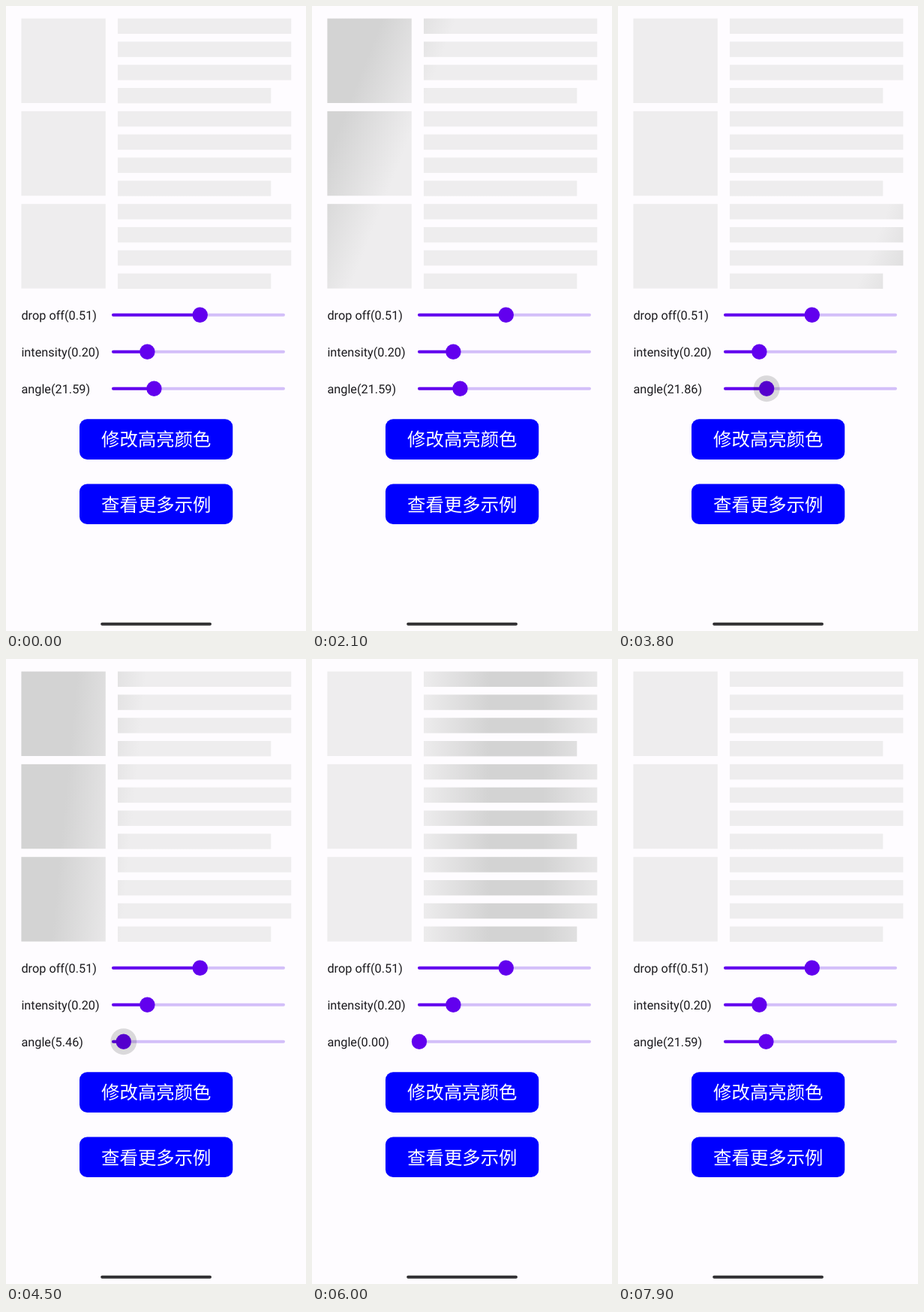
Recreate the animation shown at these times as an HTML page. Size 400 px wide and 831 px high, loop 8000 ms.

```html
<!DOCTYPE html>
<html lang="zh-CN">
<head>
<meta charset="utf-8">
<title>Shimmer</title>
<style>
html, body { margin: 0; width: 100%; height: 100%; overflow: hidden; background: #fefcff; }
svg { display: block; width: 400px; height: 831px; text-rendering: geometricPrecision; }
.label { font: 16.3px Roboto, sans-serif; fill: #1c1b1f; }
.button { font: 24.4px "Noto Sans CJK SC", "Noto Sans CJK", sans-serif; fill: #fff; text-anchor: middle; }
</style>
</head>
<body>
<svg id="stage" viewBox="0 0 400 831"></svg>
<script>
const LOOP = 8000, STEP = 100;
const SIZE = 360, CENTER = [200.5, 196.5];
const FIRST_SWEEP = 600, SWEEP = 1000, PAUSE = 200;
const DROP_OFF = 0.51, INTENSITY = 0.2, TILT = 21.59, HELD_TILT = 21.86;
const BASE = '#eeedee', HIGHLIGHT = '#d3d3d3', BLUE = '#0000ff', PURPLE = '#6200ee';
const stage = document.getElementById('stage');

const clamp = v => Math.min(1, Math.max(0, v));
const ramp = (t, from, to) => clamp((t - from) / (to - from));

function add(tag, attrs, text = '', parent = stage) {
  const el = document.createElementNS('http://www.w3.org/2000/svg', tag);
  for (const key in attrs) el.setAttribute(key, attrs[key]);
  el.textContent = text;
  return parent.appendChild(el);
}

function box(x, y, width, height, fill, rx = 0) {
  return add('rect', { x, y, width, height, fill, rx });
}

function addShine() {
  const gradient = add('linearGradient', {
    id: 'shine', gradientUnits: 'userSpaceOnUse', x1: -SIZE / 2, x2: SIZE / 2, y1: 0, y2: 0
  });
  const core = INTENSITY / 2, edge = (INTENSITY + DROP_OFF) / 2;
  for (const d of [-edge, -core, core, edge]) {
    const color = Math.abs(d) === edge ? BASE : HIGHLIGHT;
    add('stop', { offset: 0.5 + d, 'stop-color': color }, '', gradient);
  }
  return gradient;
}

function addSlider(y, name, max) {
  const label = add('text', { class: 'label', x: 20.4, y: y + 6.6 });
  box(141, y - 2, 231, 4.1, '#d3bff9', 2);
  const active = box(141, y - 2, 0, 4.1, PURPLE, 2);
  const knob = add('circle', { cy: y, r: 10.2, fill: PURPLE });
  const halo = add('circle', { cy: y, r: 17.5, 'fill-opacity': 0 });
  return (value, touch = 0) => {
    const x = 143 + value / max * 227;
    label.textContent = `${name}(${value.toFixed(2)})`;
    active.setAttribute('width', x - 141);
    knob.setAttribute('cx', x);
    halo.setAttribute('cx', x);
    halo.setAttribute('fill-opacity', 0.14 * touch);
  };
}

function addButton(y, text) {
  box(98, y, 204.3, 53.7, BLUE, 10.2);
  add('text', { class: 'button', x: 200.3, y: y + 36.2 }, text);
}

const shine = addShine();
for (let row = 0; row < 3; row++) {
  const top = 16.6 + row * 123.3;
  box(20.4, top, 112.4, 112.4, 'url(#shine)');
  for (let i = 0; i < 4; i++) {
    box(149, top + i * 30.8, i < 3 ? 231.3 : 204.3, 20.4, 'url(#shine)');
  }
}

addSlider(410.7, 'drop off', 1)(DROP_OFF);
addSlider(459.7, 'intensity', 1)(INTENSITY);
const setAngle = addSlider(508.7, 'angle', 90);
addButton(549.2, '修改高亮颜色');
addButton(635.4, '查看更多示例');
box(126.2, 819.7, 147.8, 4, '#313033', 2);

// The knob is pressed, dragged to zero, and later set back.
function angleAt(t) {
  const held = t >= 3600 && t < 6500;
  return held ? HELD_TILT * (1 - ramp(t, 3900, 4700)) : TILT;
}

function sweepAt(t) {
  return clamp(Math.max(0, t - FIRST_SWEEP) % (SWEEP + PAUSE) / SWEEP);
}

function draw(t) {
  const angle = angleAt(t);
  const travel = SIZE * (1 + Math.tan(angle * Math.PI / 180));
  const shift = travel * (2 * sweepAt(t) - 1);
  shine.setAttribute('gradientTransform',
    `translate(${CENTER}) rotate(${angle}) translate(${shift})`);
  setAngle(angle, ramp(t, 3500, 3700) - ramp(t, 4800, 5000));
}

const start = performance.now();
function tick() {
  const t = (performance.now() - start) % LOOP;
  draw(Math.floor(t / STEP) * STEP);
  requestAnimationFrame(tick);
}
tick();
</script>
</body>
</html>
```
